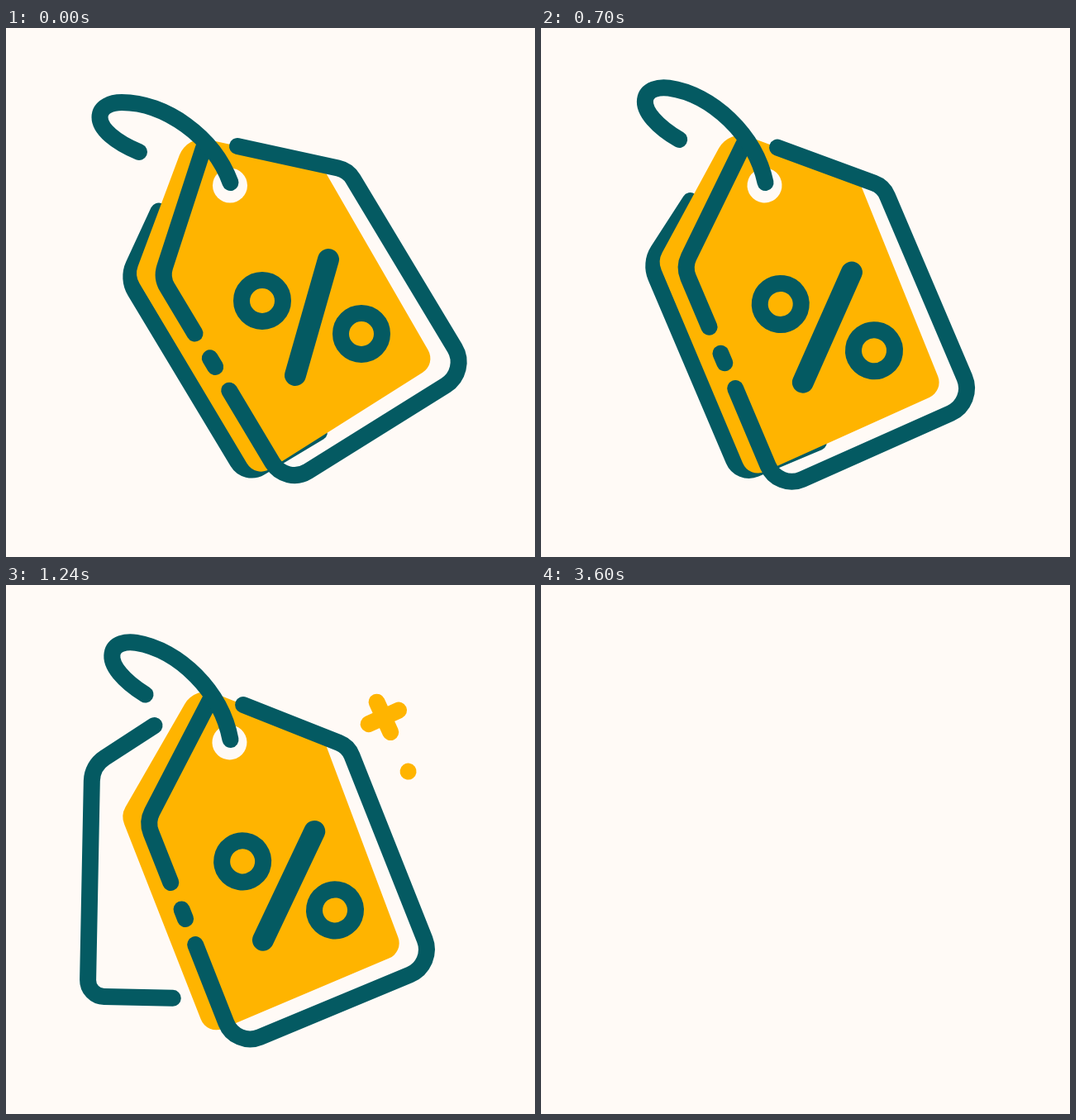
An HTML page with a canvas that plays this animation: 640 px wide and 640 px high, repeating every 3620 ms.

```html
<!DOCTYPE html>
<html lang="en">
<head>
<meta charset="utf-8">
<title>Discount tag</title>
<style>
  html, body { margin: 0; width: 100%; height: 100%; overflow: hidden; background: #fffaf6; }
  canvas { display: block; width: 100vw; height: 100vh; }
</style>
</head>
<body>
<canvas id="stage" width="640" height="640"></canvas>
<script>
const ctx = document.getElementById('stage').getContext('2d');
const CREAM = '#fffaf6', TEAL = '#045a62', AMBER = '#ffb400';
const LOOP = 3620, BLANK_AT = 3600, STEP = 20;
const PIVOT = [271.5, 187];
const BACK_SWING = 22.9;

// Symmetric cubic-bezier(k, 0, 1 - k, 1), solved by bisection.
function ease(x, k) {
  if (x <= 0) return 0;
  if (x >= 1) return 1;
  let lo = 0, hi = 1, s = 0.5;
  for (let i = 0; i < 30; i++) {
    s = (lo + hi) / 2;
    const r = 1 - s;
    if (3 * r * r * s * k + 3 * r * s * s * (1 - k) + s * s * s < x) lo = s;
    else hi = s;
  }
  return s * s * (3 - 2 * s);
}

const tween = (t, start, end, from, to, k = 0.6) =>
  from + (to - from) * ease((t - start) / (end - start), k);

function swingAngle(t) {
  if (t < 461) return tween(t, 0, 461, 0, -6);
  if (t < 917) return tween(t, 461, 917, -6, 19);
  return tween(t, 917, 1560, 19, 0);
}

function rotateAbout([x, y], degrees) {
  ctx.translate(x, y);
  ctx.rotate(degrees * Math.PI / 180);
  ctx.translate(-x, -y);
}

// Points are [x, y, cornerRadius]; the ends have no radius.
function roundedPath(points) {
  ctx.beginPath();
  ctx.moveTo(points[0][0], points[0][1]);
  for (let i = 1; i < points.length; i++) {
    const [x, y, radius] = points[i];
    if (radius) ctx.arcTo(x, y, points[i + 1][0], points[i + 1][1], radius);
    else ctx.lineTo(x, y);
  }
}

function strokePath(points, width = 20, color = TEAL) {
  roundedPath(points);
  ctx.lineWidth = width;
  ctx.strokeStyle = color;
  ctx.stroke();
}

function disc(x, y, radius, color) {
  ctx.beginPath();
  ctx.arc(x, y, radius, 0, Math.PI * 2);
  ctx.fillStyle = color;
  ctx.fill();
}

function ring(x, y) {
  ctx.beginPath();
  ctx.arc(x, y, 25, 0, Math.PI * 2);
  ctx.lineWidth = 20;
  ctx.strokeStyle = TEAL;
  ctx.stroke();
}

function drawBackTag(t) {
  ctx.save();
  rotateAbout(PIVOT, tween(t, 862, 1258, -BACK_SWING, 0, 1 / 3));
  strokePath([[178, 185], [111.5, 245.5, 34], [150.9, 521.4, 20], [253, 507]]);
  ctx.restore();
}

function drawFrontTag() {
  roundedPath([[381, 165], [520.3, 406.5, 20], [302, 544.5, 20],
    [155.6, 299, 24], [219, 129.5, 30], [381, 165]]);
  ctx.fillStyle = AMBER;
  ctx.fill();
  disc(271, 190.5, 21, CREAM);

  strokePath([[239, 145], [188, 302, 30], [228.5, 369.5]]);
  strokePath([[246.8, 399.3], [253.2, 410]]);
  strokePath([[270.2, 438.7], [338.6, 553.1, 31], [559.6, 415, 33],
    [413.5, 172, 28], [280, 143]]);
}

function drawPercent() {
  ring(310, 330);
  ring(430, 370);
  strokePath([[390, 280], [350, 420]], 26);
}

function drawCord() {
  ctx.beginPath();
  ctx.moveTo(...PIVOT);
  ctx.bezierCurveTo(251, 131, 192, 90, 140, 90);
  ctx.bezierCurveTo(128, 90, 113.5, 95, 113.5, 108);
  ctx.bezierCurveTo(113.5, 122, 132, 138, 161, 150);
  ctx.lineWidth = 20;
  ctx.strokeStyle = TEAL;
  ctx.stroke();
}

function drawSparkle(t) {
  const size = tween(t, 917, 1220, 0, 1);
  if (size <= 0) return;
  disc(490, 190, 10 * size, AMBER);
  ctx.save();
  ctx.translate(450, 130);
  ctx.rotate(tween(t, 860, 1550, -90, 0) * Math.PI / 180);
  ctx.scale(size, size);
  strokePath([[-20, 0], [20, 0]], 20, AMBER);
  strokePath([[0, -20], [0, 20]], 20, AMBER);
  ctx.restore();
}

function draw(t) {
  ctx.setTransform(1, 0, 0, 1, 0, 0);
  ctx.fillStyle = CREAM;
  ctx.fillRect(0, 0, 640, 640);
  if (t >= BLANK_AT) return;

  ctx.lineCap = ctx.lineJoin = 'round';
  rotateAbout(PIVOT, swingAngle(t));
  drawBackTag(t);
  drawFrontTag();
  drawPercent();
  drawCord();
  drawSparkle(t);
}

let origin = null;
function tick(now) {
  if (origin === null) origin = now;
  const t = Math.max(0, now - origin) % LOOP;
  draw(Math.floor(t / STEP) * STEP);
  requestAnimationFrame(tick);
}
draw(0);
requestAnimationFrame(tick);
</script>
</body>
</html>
```
